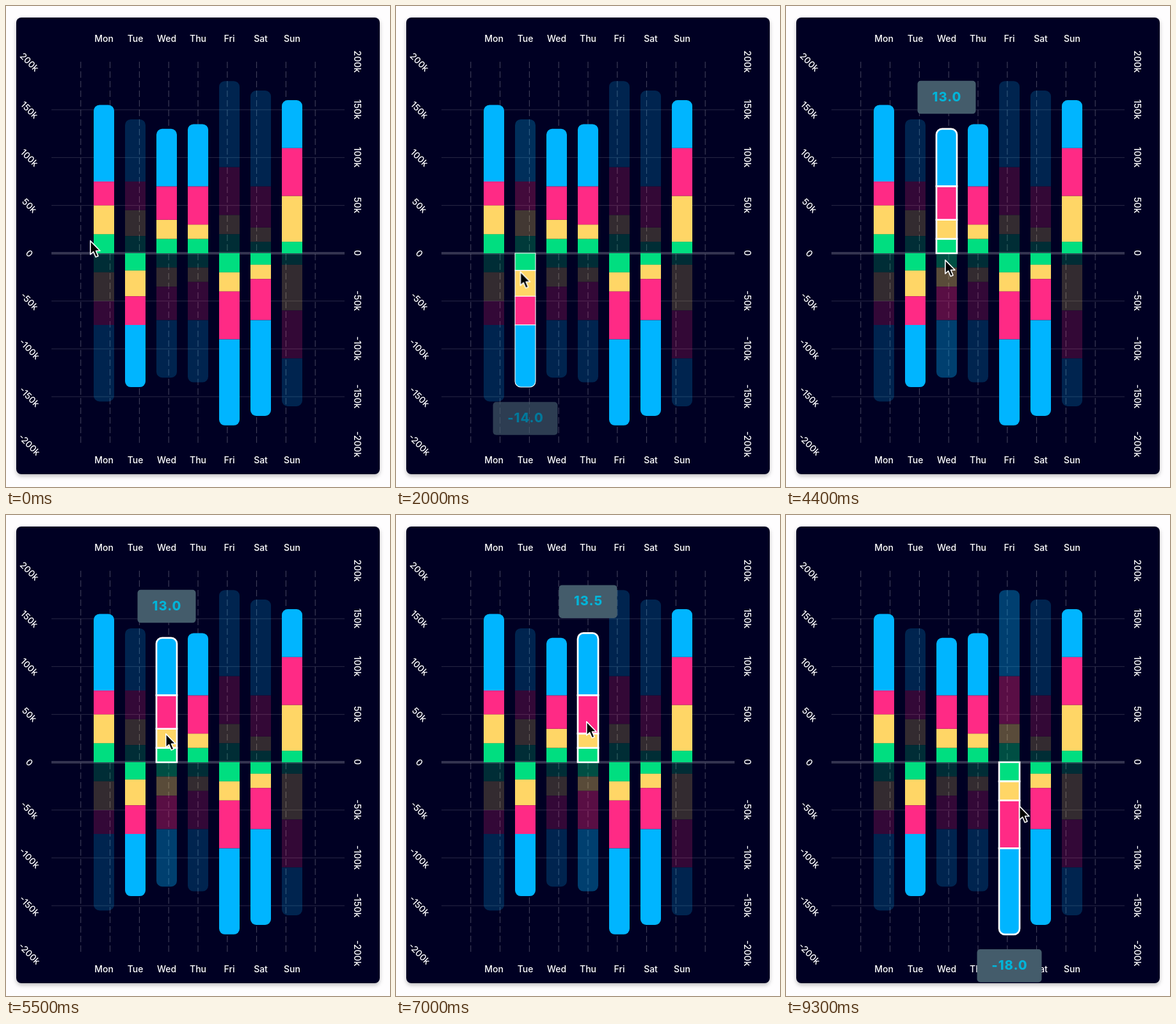
Recreate the animation shown at these times as an HTML page. Size 600 px wide and 751 px high, loop 9400 ms.

```html
<!DOCTYPE html>
<html lang="en">
<head>
<meta charset="utf-8">
<title>Weekly stacked bars</title>
<style>
html, body { margin: 0; width: 100%; height: 100%; overflow: hidden; background: #fefdfe; }
.card { position: absolute; left: 16px; top: 18px; width: 568px; height: 713px; border-radius: 8px;
  background: #000023; box-shadow: 0 3px 6px rgba(0, 0, 0, .25); }
svg { position: absolute; left: 0; top: 0; width: 600px; height: 751px; }
text { font: 500 14px Inter, sans-serif; fill: #fff; text-anchor: middle; }
.grid { stroke: #fff; stroke-opacity: .16; }
.dash { stroke: #fff; stroke-opacity: .27; stroke-dasharray: 10 5; }
.zero { stroke: #fff; stroke-opacity: .2; stroke-width: 4; }
.faint { opacity: .2; }
.solid { stroke: #fff; stroke-width: 0; }
.tip { opacity: 0; }
.tip rect { fill: #445c6b; }
.tip text { font-weight: 800; font-size: 20px; letter-spacing: 1px; fill: #00b4d8; }
.solid, .faint, .tip, #cursor { animation: 9400ms linear infinite; }
#cursor { animation-name: cursor; animation-timing-function: cubic-bezier(.333, 0, .667, 1); }
#cursor path { fill: #000; stroke: #fff; stroke-width: 1.6; stroke-linejoin: round; }
</style>
</head>
<body>
<div class="card"></div>
<svg viewBox="0 0 600 751" id="chart"></svg>
<script>
const LOOP = 9400, ZERO = 386, STEP = 74.67, HALF = 16;
const COLORS = ['#00de80', '#ffd666', '#ff2a85', '#00b5ff'];

// segment sizes in thousands; a minus sign means the solid stack hangs down
const DAYS = { Mon: '+20 30 25 80', Tue: '-18 27 30 65', Wed: '+15 20 35 60', Thu: '+15 15 40 65',
  Fri: '-20 20 50 90', Sat: '-12 15 43 100', Sun: '+12 48 50 50' };

// time, x, y of the pointer tip
const PATH = [[0, 131, 365], [1300, 169, 386], [2400, 204, 425], [3100, 228, 369],
  [4400, 248, 395], [5500, 249, 340], [7000, 297, 321], [9300, 364, 453], [LOOP, 364, 453]];

let css = '';
const pct = t => (t / LOOP * 100).toFixed(3) + '%';
const yOf = k => ZERO - k / 50 * STEP;
const label = (x, y, s, turn = 0) =>
  `<text transform="translate(${x} ${y}) rotate(${turn})" y="5">${s}</text>`;

function pointer(t) {
  const i = PATH.findIndex(p => p[0] > t), [t0, x0, y0] = PATH[i - 1], [t1, x1, y1] = PATH[i];
  const u = (t - t0) / (t1 - t0), e = u * u * (3 - 2 * u);
  return [x0 + (x1 - x0) * e, y0 + (y1 - y0) * e];
}

// first and last time at which the pointer passes the test
function span(test) {
  let from = -1, to = -1;
  for (let t = 0; t < LOOP; t += 10) {
    if (!test(...pointer(t))) continue;
    if (from < 0) from = t;
    to = t + 10;
  }
  return from < 0 ? null : [from, to];
}

function fade(name, prop, off, on, [from, to], rise, fall) {
  const out = to < LOOP
    ? `${pct(to)} {${prop}:${on}} ${pct(to + fall)}, 100% {${prop}:${off}}`
    : `100% {${prop}:${on}}`;
  css += `@keyframes ${name} {0%, ${pct(from)} {${prop}:${off}} ${pct(from + rise)} {${prop}:${on}} ${out}}\n`;
}

function stack(x, sizes, sign) {
  let sum = 0;
  return sizes.map((size, i) => {
    const y0 = yOf(sign * sum), y1 = yOf(sign * (sum += size));
    const r = i === 3 ? 9 : 0, ry = y1 + sign * r, arc = `A${r} ${r} 0 0 ${sign > 0 ? 1 : 0} `;
    return `<path fill="${COLORS[i]}" d="M${x - HALF} ${y0}V${ry}${arc}${x - HALF + r} ${y1}` +
      `H${x + HALF - r}${arc}${x + HALF} ${ry}V${y0}Z"/>`;
  }).join('');
}

function tooltip(x, value, name) {
  const up = value > 0, w = up ? 91 : 101, y = yOf(value) + (up ? -75 : 23.2);
  return `<g class="tip" style="animation-name:${name}">` +
    `<rect x="${x - w / 2}" y="${y}" width="${w}" height="51.5" rx="5"/>` +
    `<text x="${x + .5}" y="${y + 32}">${(value / 10).toFixed(1)}</text></g>`;
}

let grid = '', labels = '', bars = '', tips = '';
for (let i = 1; i < 10; i++) grid += `<path class="dash" d="M${71 + 45.8 * i} 87V685"/>`;
for (let k = -200; k <= 200; k += 50) {
  const y = yOf(k), name = k ? k + 'k' : '0';
  if (Math.abs(k) < 200) grid += `<path class="${k ? 'grid' : 'zero'}" d="M71 ${y}H529"/>`;
  labels += label(36.5, y + .3, name, 45) + label(548.5, y - .5, name, 90);
}

Object.entries(DAYS).forEach(([day, data], i) => {
  const x = 153 + 49 * i, sign = data[0] === '-' ? -1 : 1;
  const sizes = data.slice(1).split(' ').map(Number);
  const total = sign * sizes.reduce((a, b) => a + b);
  labels += label(x, 50.5, day) + label(x, 708.5, day);
  bars += `<g class="faint" style="animation-name:faint${i}">${stack(x, sizes, -sign)}</g>` +
    `<g class="solid" style="animation-name:solid${i}">${stack(x, sizes, sign)}</g>`;

  // the whole column highlights, only the solid half opens the tooltip
  const over = px => Math.abs(px - x) < HALF + 2;
  const hover = span(over);
  if (!hover) return;
  const open = span((px, py) => over(px) && sign * (ZERO - py) > -1);
  fade('faint' + i, 'opacity', .2, .35, hover, 500, 500);
  fade('solid' + i, 'stroke-width', '0px', '2.7px', hover, 500, 500);
  fade('tip' + i, 'opacity', 0, 1, open, 300, 150);
  tips += tooltip(x, total, 'tip' + i);
});

css += '@keyframes cursor {' +
  PATH.map(([t, x, y]) => `${pct(t)} {transform:translate(${x}px, ${y}px)}`).join(' ') + '}';
document.head.appendChild(document.createElement('style')).textContent = css;
document.getElementById('chart').innerHTML = grid + labels + bars + tips +
  '<g id="cursor"><path d="M.8 1.6V23L5.6 18.6L9.2 27L13 25.4L9.5 17.2H16Z"/></g>';
</script>
</body>
</html>
```
